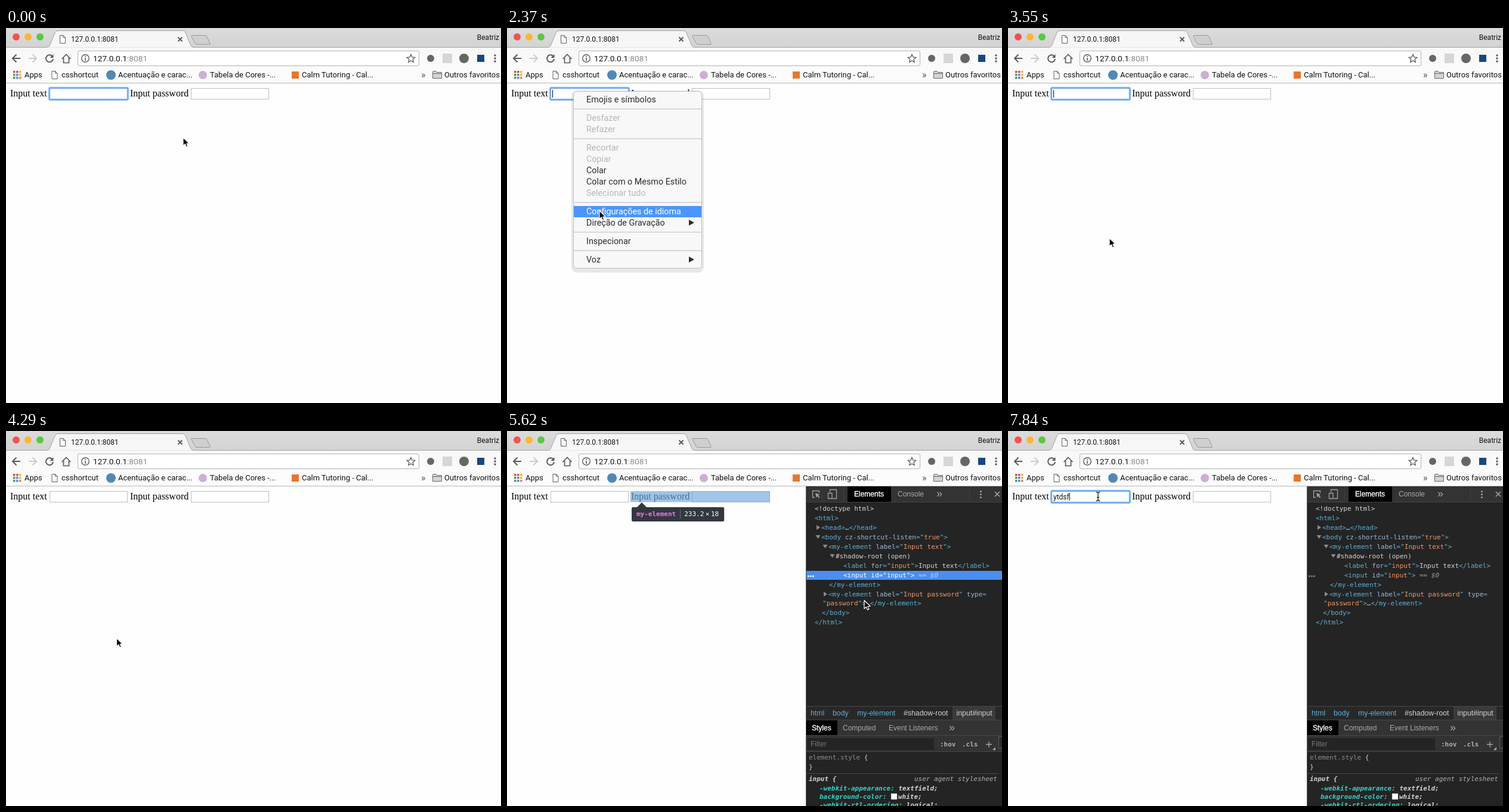
Recreate the animation shown at these times as an HTML page. Size 830 by 630 pixels, loop 7990 ms.

```html
<!DOCTYPE html>
<html lang="pt">
<head>
<meta charset="utf-8">
<title>Input demo</title>
<style>
  html, body { margin: 0; width: 100%; height: 100%; overflow: hidden; background: #fefefe; }
  svg { display: block; }
  text { white-space: pre; }
  .ui { font: 13px Roboto, sans-serif; fill: #111; }
  .tab { font-size: 12px; }
  .url { font-size: 13.7px; }
  .menu { font: 14.35px Roboto, sans-serif; fill: #2c2c2c; }
  .off { fill: #b6b6b6; }
  .on { fill: #fff; }
  .page { font: 16px "Liberation Serif", serif; fill: #000; }
  .dev { font: 12px "Liberation Sans", sans-serif; fill: #a9a9a9; }
  .dev .lit { fill: #fff; stroke: #fff; stroke-width: .35; }
  .crumb { font-size: 12.3px; fill: #5db0d7; }
  .pale { fill: #d2d2d2; }
  .mono { font: 11px "DejaVu Sans Mono", monospace; fill: #d4d4d4; }
  .tag { fill: #5db0d7; }
  .attr { fill: #9bbbdc; }
  .val { fill: #f29766; }
  .picked, .picked tspan { fill: #fff; }
  .dim { fill: #8c8c8c; }
  .b { font-weight: bold; }
  .i { font-style: italic; }
  .prop { fill: #35d4c7; }
  .line { fill: none; stroke: #5a5a5a; stroke-width: 2; }
</style>
</head>
<body>
<svg width="830" height="630" viewBox="0 0 830 630">
  <defs>
    <linearGradient id="strip" x2="0" y2="1">
      <stop stop-color="#dbdbdb"/><stop offset="1" stop-color="#d3d3d3"/>
    </linearGradient>
    <linearGradient id="bar" gradientUnits="userSpaceOnUse" x1="0" x2="0" y1="5" y2="92">
      <stop stop-color="#f5f5f5"/><stop offset="1" stop-color="#fdfdfd"/>
    </linearGradient>
    <path id="doc" d="M.5 .5H6L9.5 4V13.5H.5ZM6 .5V4H9.5" fill="#fff" stroke="#5c5c5c"/>
  </defs>
  <rect width="830" height="630" fill="#fefefe"/>

  <!-- page -->
  <g class="page">
    <text x="7" y="115">Input text</text>
    <text x="208" y="115">Input password</text>
  </g>
  <g fill="#fff" stroke="#bdbdbd">
    <rect x="73.5" y="101.5" width="130" height="18"/>
    <rect x="310.5" y="101.5" width="130" height="18"/>
  </g>
  <g id="focus" fill="none" stroke="#5fa7f6">
    <rect x="72.5" y="100.5" width="132" height="20" rx="2" stroke-width="4" opacity=".35"/>
    <rect x="72.5" y="100.5" width="132" height="20" rx="1.5" stroke-width="1.8"/>
  </g>
  <text id="typed" class="ui tab" x="76" y="115"></text>
  <rect id="caret" y="104" width="1" height="13"/>
  <g id="overlay"></g>

  <!-- browser frame -->
  <rect width="830" height="33" fill="url(#strip)"/>
  <rect y="33" width="830" height="59" fill="url(#bar)"/>
  <path d="M0 32.5H68Q72 32.5 73.500 29L82 8Q83.500 4.500 87 4.500H296Q299.500 4.500 301 8L309.500 29Q311 32.500 315 32.500H830" fill="url(#bar)" stroke="#a2a2a2"/>
  <path d="M0 92.5H830" stroke="#b4b4b4"/>
  <path d="M312 12.500H334Q336 12.500 337 14.500L342 25.500Q343 27.500 341 27.500H320Q318 27.500 317 25.500L311 14.500Q310 12.500 312 12.500Z" fill="#cfcfcf" stroke="#999"/>
  <circle cx="17" cy="15" r="6" fill="#f4524d"/>
  <circle cx="37" cy="15" r="6" fill="#fbb730"/>
  <circle cx="57" cy="15" r="6" fill="#5cc73f"/>
  <use href="#doc" x="90" y="12"/>
  <path class="line" stroke-width="1.5" d="M288.500 15.500l7 7m0-7l-7 7"/>
  <g class="line">
    <path d="M24 51H11M17.500 44.500L11 51l6.500 6.500"/>
    <path d="M38 51H51M44.500 44.500L51 51l-6.500 6.500" stroke="#cbcbcb"/>
    <path d="M77.500 47.200A6 6 0 1 0 79 52"/>
    <path d="M79.500 44v6h-6Z" fill="#5a5a5a" stroke="none"/>
    <path d="M93.500 52L101 44.500l7.500 7.500M96.500 50V58.500H105.500V50" stroke-width="1.7"/>
  </g>
  <rect x="120.5" y="38.5" width="572" height="25" rx="2.500" fill="#fff" stroke="#b3b3b3"/>
  <circle cx="133" cy="51" r="6.3" fill="none" stroke="#5a5a5a" stroke-width="1.400"/>
  <path d="M133 47v1.700M133 50v5" stroke="#5a5a5a" stroke-width="1.600"/>
  <path d="M679 44.500l1.900 4.500 4.900.4-3.700 3.200 1.100 4.800-4.200-2.500-4.200 2.500 1.100-4.800-3.700-3.200 4.900-.4Z" fill="none" stroke="#5a5a5a" stroke-width="1.300"/>
  <circle cx="712" cy="51" r="6" fill="#666"/>
  <rect x="732" y="43" width="16" height="16" fill="#d6d6d6"/>
  <circle cx="768" cy="51" r="8" fill="#666"/>
  <rect x="790" y="45" width="12" height="12" fill="#17477f"/>
  <g fill="#5a5a5a">
    <circle cx="820" cy="46" r="1.700"/><circle cx="820" cy="51" r="1.700"/><circle cx="820" cy="56" r="1.700"/>
  </g>
  <g id="apps"></g>
  <use href="#doc" x="76.500" y="72"/>
  <circle cx="176" cy="79" r="8" fill="#5288b5"/>
  <circle cx="330" cy="79" r="7" fill="#cdaed6"/>
  <rect x="479" y="73" width="12" height="12" fill="#e8762c"/>
  <path d="M715.500 84.500V73.500Q715.500 72.500 716.500 72.500H721L722.500 74.500H730.500V84.500ZM715.500 76.500H730.500" fill="#d4d4d4" stroke="#666"/>
  <g class="ui">
    <text class="tab" x="109" y="23">127.0.0.1:8081</text>
    <text class="tab" x="827" y="20" text-anchor="end">Beatriz</text>
    <text class="url" x="146" y="56">127.0.0.1<tspan fill="#888">:8081</tspan></text>
    <text x="31" y="83">Apps</text>
    <text x="93" y="83">csshortcut</text>
    <text x="188" y="83">Acentuação e carac...</text>
    <text x="342" y="83">Tabela de Cores -...</text>
    <text x="496" y="83">Calm Tutoring - Cal...</text>
    <text x="696" y="84" font-size="16" fill="#555">»</text>
    <text x="735" y="83">Outros favoritos</text>
  </g>

  <!-- developer panel -->
  <g id="panel">
    <rect x="501" y="93" width="329" height="537" fill="#242424"/>
    <path d="M501.500 93V630" stroke="#4b4b4b"/>
    <rect x="502" y="93" width="328" height="26" fill="#333"/>
    <path d="M502 119.500H830M564.500 98V115M775.500 98V115" stroke="#444"/>
    <rect x="571" y="93" width="73" height="26"/>
    <g fill="none" stroke="#a2a2a2" stroke-width="1.300">
      <path d="M523.500 104V100.500H512.500V111.500H516"/>
      <path d="M517 104l7.500 3-3 1.200 3 3-1.500 1.300-2.800-3-1.400 2.500Z" fill="#a2a2a2" stroke="none"/>
      <path d="M541.500 103V98.500H552.500V113.500H546M538.500 104.500H545V113.500H538.500Z"/>
      <path d="M818 102l8 8m0-8l-8 8" stroke-width="1.700"/>
    </g>
    <g fill="#a2a2a2">
      <circle cx="794.500" cy="101.500" r="1.500"/><circle cx="794.500" cy="106.500" r="1.500"/><circle cx="794.500" cy="111.500" r="1.500"/>
    </g>
    <g class="dev">
      <text class="lit" x="582" y="110">Elements</text>
      <text x="655" y="110">Console</text>
      <text x="720" y="111" font-size="18">»</text>
    </g>
    <g id="content">
      <rect id="row" x="502" y="235" width="328" height="15" fill="#4a8ff0"/>
      <g id="dots"><circle cx="505.500" cy="244" r="1.400"/><circle cx="509.500" cy="244" r="1.400"/><circle cx="513.500" cy="244" r="1.400"/></g>
      <g id="tree" class="mono"></g>
      <rect x="502" y="462" width="328" height="77" fill="#333"/>
      <rect x="502" y="463" width="328" height="22" fill="#282828"/>
      <rect x="747" y="463" width="72" height="22" fill="#3a3a3a"/>
      <path d="M502 462.500H830M502 485.500H830M502 511.500H830M502 538.500H830M502 575.500H824" stroke="#474747"/>
      <rect x="502" y="486" width="52" height="25" fill="#000"/>
      <rect x="503" y="516" width="213" height="20" fill="#242424"/>
      <rect x="824.500" y="513.500" width="8" height="19" fill="#2c2c2c" stroke="#5c5c5c"/>
      <path d="M814 536h5v-5Z" fill="#a9a9a9"/>
      <path d="M803 526.500h10M808 521.500v10" stroke="#a9a9a9" stroke-width="1.300"/>
      <g class="dev">
        <text class="crumb" x="509" y="478">html</text>
        <text class="crumb" x="546" y="478">body</text>
        <text class="crumb" x="587" y="478">my-element</text>
        <text class="crumb pale" x="665" y="478">#shadow-root</text>
        <text class="crumb pale" x="753.500" y="478">input#input</text>
        <text class="lit" x="511" y="503">Styles</text>
        <text x="563" y="503">Computed</text>
        <text x="640" y="503">Event Listeners</text>
        <text x="741" y="504" font-size="18">»</text>
        <text x="509" y="530" fill="#777">Filter</text>
      </g>
      <g class="mono">
        <text class="b" x="726" y="530" fill="#b0b0b0">:hov</text>
        <text class="b" x="763" y="530" fill="#b0b0b0">.cls</text>
        <text x="506" y="552"><tspan class="dim">element.style</tspan> {</text>
        <text x="506" y="568">}</text>
        <text class="b i" x="506" y="588">input {</text>
        <text class="i" x="822" y="588" text-anchor="end" fill="#b0b0b0">user agent stylesheet</text>
        <g class="b i">
          <text x="524" y="604"><tspan class="prop">-webkit-appearance:</tspan> textfield;</text>
          <text class="prop" x="524" y="618">background-color:</text>
          <text x="656" y="618">white;</text>
          <text x="524" y="632"><tspan class="prop">-webkit-rtl-ordering:</tspan> logical;</text>
        </g>
      </g>
      <rect x="644" y="609" width="10" height="10" fill="#fff" stroke="#888" stroke-width=".5"/>
    </g>
  </g>

  <!-- context menu -->
  <g id="menu">
    <rect x="108" y="105" width="222" height="306" rx="9" opacity=".09"/>
    <rect x="111.500" y="106.500" width="215" height="297" rx="5" fill="#f8f8f8" stroke="#bfbfbf"/>
    <path d="M112 136H326M112 186H326M112 293H326M112 343H326M112 374H326" stroke="#d9d9d9" stroke-width="2"/>
    <rect id="mark" x="112" width="214" height="19" fill="#4c95fd"/>
    <g id="items" class="menu"></g>
  </g>

  <path id="arrow" d="M0 0V14L3.300 10.900 5.500 15.900 7.900 14.900 5.800 10H10.200Z" stroke="#fff" stroke-width="1.200" stroke-linejoin="round"/>
  <path id="beam" d="M-3.500 -7.500Q0 -7.500 0 -5V5Q0 7.500 -3.500 7.500M3.500 -7.500Q0 -7.500 0 -5V5Q0 7.500 3.500 7.500M-2 1.500H2" fill="none" stroke="#000" stroke-width="1.200"/>
</svg>
<script>
const $ = id => document.getElementById(id);
const LOOP = 7990, STEPS = 54;
const CHAR = 6.62; // mono advance at 11px

// label, middle y, kind
const ITEMS = [
  ['Emojis e símbolos', 120], ['Desfazer', 151, 'off'], ['Refazer', 170, 'off'],
  ['Recortar', 201, 'off'], ['Copiar', 220, 'off'], ['Colar', 239],
  ['Colar com o Mesmo Estilo', 258], ['Selecionar tudo', 277, 'off'],
  ['Configurações de idioma', 308], ['Direção de Gravação', 327, 'sub'],
  ['Inspecionar', 358], ['Voz', 389, 'sub']
];

// x, baseline, markup, fold sign
const TREE = [
  [516, 134, '<!doctype html>'],
  [516, 150, '<html>'],
  [527, 166, '<head>…</head>', '▶'],
  [527, 182, '<body cz-shortcut-listen="true">', '▼'],
  [539, 198, '<my-element label="Input text">', '▼'],
  [551, 214, '#shadow-root (open)', '▼'],
  [564, 230, '<label for="input">Input text</label>'],
  [564, 246, '<input id="input">'],
  [540, 262, '</my-element>'],
  [539, 278, '<my-element label="Input password" type=', '▶'],
  [529, 293, '"password">…</my-element>'],
  [528, 309, '</body>'],
  [516, 325, '</html>']
];

// step, x, y
const PATH = [
  [0, 297, 184], [3, 220, 160], [6, 130, 124], [8, 110, 117], [9, 110, 109],
  [13, 110, 109], [14, 118, 135], [15, 142, 230], [16, 155, 307], [18, 159, 338],
  [20, 162, 357], [22, 162, 357], [24, 170, 353], [29, 185.5, 348], [31, 185.5, 348],
  [32, 200, 346], [34, 360, 290], [36, 525, 247], [37, 575, 247], [38, 599, 284.5],
  [39, 601, 281], [40, 590, 258], [41, 540, 228], [42, 420, 180], [43, 290, 140],
  [44, 185, 116], [45, 147, 110], [46, 147, 110], [47, 151, 110], [54, 151, 110]
];

const esc = s => s.replace(/&/g, '&amp;').replace(/</g, '&lt;').replace(/>/g, '&gt;');
const span = (cls, s) => `<tspan class="${cls}">${esc(s)}</tspan>`;

function colorize(src) {
  if (src.startsWith('<!')) return esc(src);
  let inTag = false;
  return src.match(/"[^"]*"|<\/?[\w-]+|[>=]|[^"<>=]+/g).map(s => {
    if (s[0] === '"') return span('tag', '"') + span('val', s.slice(1, -1)) + span('tag', '"');
    if (s[0] === '<') inTag = true;
    if (s === '>') inTag = false;
    return span(/^[<>=]/.test(s) ? 'tag' : inTag ? 'attr' : '', s);
  }).join('');
}

function fold(sign, x, y) {
  const d = sign === '▶' ? `M${x - 8} ${y - 8}v8l6-4Z` : `M${x - 9.5} ${y - 7}h8l-4 6Z`;
  return `<path class="dim" d="${d}"/>`;
}

function build() {
  const hues = ['#e04a3f', '#e04a3f', '#f0b72f', '#4c9a4c', '#4a86e8', '#f0b72f', '#4c9a4c', '#4a86e8', '#e8833a'];
  $('apps').innerHTML = hues.map((c, i) =>
    `<rect x="${12 + i % 3 * 5}" y="${72 + Math.floor(i / 3) * 5}" width="3.500" height="3.500" fill="${c}"/>`).join('');
  $('items').innerHTML = ITEMS.map(([s, y, kind]) =>
    `<text x="133" y="${y + 5}" class="${kind === 'off' ? 'off' : ''}">${s}</text>` +
    (kind === 'sub' ? `<path d="M305 ${y - 5}v10l9-5Z"/>` : '')).join('');
  $('tree').innerHTML = TREE.map(([x, y, src, sign], i) =>
    (sign ? fold(sign, x, y) : '') + `<text x="${x}" y="${y}"${i === 7 ? ' id="node"' : ''}>${colorize(src)}</text>`).join('') +
    '<text id="ref" class="i" x="690" y="246">== $0</text>';
}

function pointer(n) {
  const i = PATH.findIndex(p => p[0] > n);
  const [a, x, y] = PATH[i - 1], [b, u, v] = PATH[i];
  const k = (n - a) / (b - a);
  return [x + (u - x) * k, y + (v - y) * k];
}

// box lit on the page for the tree row under the pointer
function hovered(x, y) {
  const within = (a, b) => y >= a && y < b;
  if (x < 502) return null;
  if (within(267, 298)) return [207, 234, 'my-element', '233.2', '18'];
  if (within(235, 251)) return [73, 131, 'input#input', '131', '19'];
  if (within(219, 235)) return [7, 62, 'label', '61.8', '18'];
  if (within(187, 203) || within(251, 267)) return [7, 197, 'my-element', '196.9', '18'];
  return null;
}

function highlight([x, w, name, a, b]) {
  const mid = x + 10 + CHAR * name.length + 7;
  const size = CHAR * (a.length + b.length + 1) + 5;
  return `<rect x="${x}" y="101" width="${w}" height="18.500" fill="rgb(111,168,220)" opacity=".66"/>
    <path d="M${x + 11} 128l8-8 8 8Z" fill="#333740"/>
    <rect x="${x + 2}" y="128" width="${mid + size + 16 - x - 2}" height="24" rx="2.500" fill="#333740"/>
    <path d="M${mid + .5} 133v14" stroke="#777"/>
    <text class="mono b" x="${x + 10}" y="143" style="fill:#ee78e6">${name}</text>
    <text class="mono" x="${mid + 7}" y="143" style="fill:#fff">${a}<tspan dx="2.500">×</tspan><tspan dx="2.500">${b}</tspan></text>`;
}

const show = (id, on) => $(id).style.display = on ? '' : 'none';
const move = (id, x, y) => $(id).setAttribute('transform', `translate(${x} ${y})`);

function draw(t) {
  const n = Math.floor((t + 5) * STEPS / LOOP) % STEPS;
  const [x, y] = pointer(n);
  const menu = n >= 11 && n < 23;
  const focus = n < 25 || n >= 45;
  const loaded = n >= 32;

  const beam = !menu && x > 73 && x < 204 && y > 101 && y < 120;
  show('arrow', !beam);
  show('beam', beam);
  move(beam ? 'beam' : 'arrow', x, y);

  const typed = 'ytdsf'.slice(0, n < 51 ? 0 : (n - 51) * 2 + 1);
  $('typed').textContent = typed;
  const blink = n < 45 ? n > 0 && (n < 5 || n > 7) : n < 48 || n > 50;
  show('caret', focus && blink);
  $('caret').setAttribute('x', typed ? 76 + $('typed').getComputedTextLength() : 76);
  show('focus', focus);

  show('menu', menu);
  const pick = n === 22 ? -1 : ITEMS.findIndex(([, m, kind]) => kind !== 'off' && Math.abs(y + 1 - m) <= 9.5);
  const marked = menu && n > 13 && pick >= 0;
  show('mark', marked);
  if (marked) $('mark').setAttribute('y', ITEMS[pick][1] - 9);
  $('items').querySelectorAll('text').forEach((e, i) => e.classList.toggle('on', marked && i === pick));

  show('panel', n >= 30);
  show('content', loaded);
  const active = n < 45;
  show('row', active);
  $('dots').setAttribute('fill', active ? '#fff' : '#8c8c8c');
  $('node').setAttribute('class', active ? 'picked' : '');
  $('ref').style.fill = active ? '#b5d2f8' : '#9a9a9a';

  const box = loaded && hovered(x, y);
  $('overlay').innerHTML = box ? highlight(box) : '';
}

build();
const start = performance.now();
(function tick() {
  draw((performance.now() - start) % LOOP);
  requestAnimationFrame(tick);
})();
</script>
</body>
</html>
```
